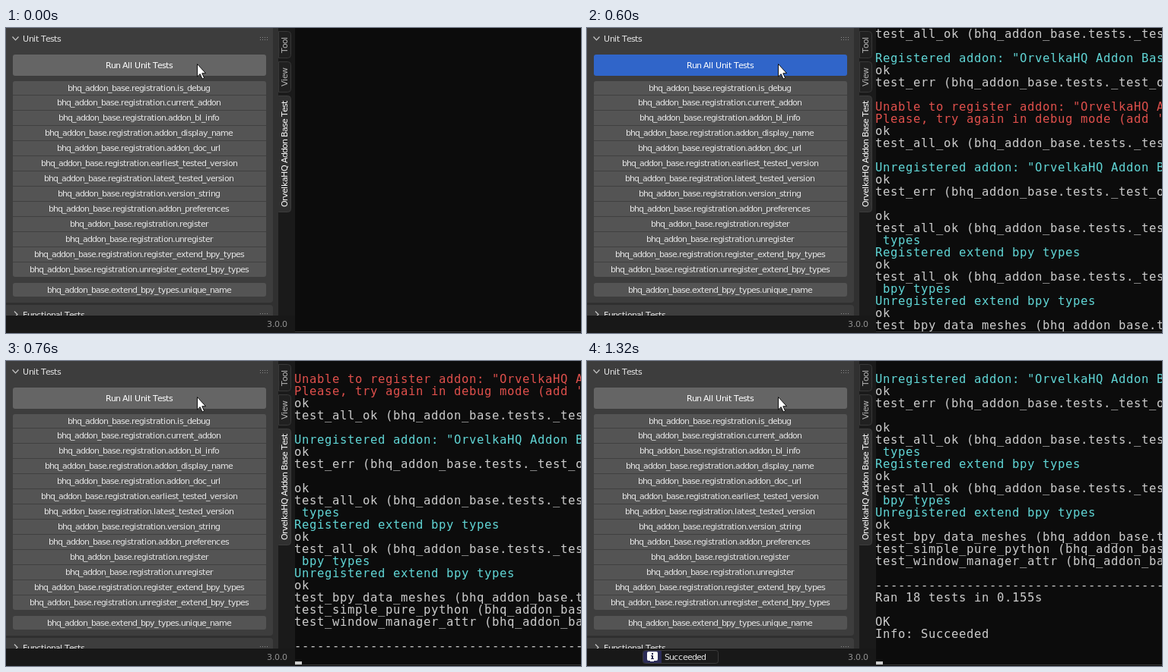
Write an HTML page with a canvas that moves like this. It is 756 px wide and 402 px high and loops after 1440 ms.

```html
<!DOCTYPE html>
<html lang="en">
<head>
<meta charset="utf-8">
<title>Unit test run</title>
<style>
  html, body { margin: 0; width: 100%; height: 100%; overflow: hidden; background: #0c0c0c; }
  canvas { display: block; }
</style>
</head>
<body>
<canvas id="stage" width="756" height="402"></canvas>
<script>
const ctx = document.getElementById('stage').getContext('2d');
const LOOP = 1440;
const UI_FAMILY = '"DejaVu Sans", sans-serif';
const UI_FONT = '11px ' + UI_FAMILY;
const TERM_FONT = '15.5px "DejaVu Sans Mono", monospace';
const CELL_W = 10, CELL_H = 16, TERM_X = 380;
const ADDON = 'OrvelkaHQ Addon Base Test';

const TESTS = ['is_debug', 'current_addon', 'addon_bl_info', 'addon_display_name',
  'addon_doc_url', 'earliest_tested_version', 'latest_tested_version', 'version_string',
  'addon_preferences', 'register', 'unregister', 'register_extend_bpy_types',
  'unregister_extend_bpy_types'].map(name => 'bhq_addon_base.registration.' + name);

const GREY = '#cccccc', CYAN = '#61d6d6', RED = '#e0504c';
const say = (text = '', color = GREY) => ({ text, color });
const ok = say('ok'), blank = say();
const allOk = say('test_all_ok (bhq_addon_base.tests._test_ok');
const err = say('test_err (bhq_addon_base.tests._test_one');
const LINES = [
  allOk, blank, say(`Registered addon: "${ADDON}"`, CYAN), ok,
  err, blank, say(`Unable to register addon: "${ADDON}"`, RED),
  say("Please, try again in debug mode (add '--debug'", RED), ok,
  allOk, blank, say(`Unregistered addon: "${ADDON}"`, CYAN), ok,
  err, blank, ok,
  allOk, say(' types', CYAN), say('Registered extend bpy types', CYAN), ok,
  allOk, say(' bpy types', CYAN), say('Unregistered extend bpy types', CYAN), ok,
  say('test_bpy_data_meshes (bhq_addon_base.tests'),
  say('test_simple_pure_python (bhq_addon_base.tests'),
  say('test_window_manager_attr (bhq_addon_base.tests'),
  blank, say('-'.repeat(70)), say('Ran 18 tests in 0.155s'),
  blank, say('OK'), say('Info: Succeeded'), blank
];

// [start ms, lines scrolled off the top]
const SCROLL = [[600, 0], [620, 1], [760, 5], [780, 10]];
const PRESS = [420, 760];
const REPORT = [780, 880];

// Interface text advances by whole pixels, rounded down.
const advances = {};
function advance(ch) {
  if (!(ch in advances)) {
    ctx.font = '1100px ' + UI_FAMILY;
    advances[ch] = Math.floor(ctx.measureText(ch).width / 100 + 0.01);
  }
  return advances[ch];
}
const textWidth = text => [...text].reduce((sum, ch) => sum + advance(ch), 0);

function uiText(text, x, y, color = '#e6e6e6') {
  textWidth(text);
  ctx.font = UI_FONT;
  ctx.fillStyle = color;
  for (const ch of text) {
    ctx.fillText(ch, x, y);
    x += advance(ch);
  }
}
const centered = (text, y, color) =>
  uiText(text, Math.floor(175 - textWidth(text) / 2), y, color);

function rect(x, y, w, h, color) {
  ctx.fillStyle = color;
  ctx.fillRect(x, y, w, h);
}
function rounded(x, y, w, h, r, fill, stroke) {
  ctx.beginPath();
  ctx.roundRect(x, y, w, h, r);
  ctx.fillStyle = fill;
  ctx.fill();
  if (stroke) {
    ctx.strokeStyle = stroke;
    ctx.lineWidth = 1;
    ctx.stroke();
  }
}
function polyline(points, color, width) {
  ctx.beginPath();
  points.forEach(([x, y]) => ctx.lineTo(x, y));
  ctx.strokeStyle = color;
  ctx.lineWidth = width;
  ctx.stroke();
}
function clipped(x, y, w, h, draw) {
  ctx.save();
  ctx.beginPath();
  ctx.rect(x, y, w, h);
  ctx.clip();
  draw();
  ctx.restore();
}

function header(title, y, chevron) {
  polyline(chevron, '#c8c8c8', 1.2);
  uiText(title, 22, y + 4);
  for (let i = 0; i < 8; i++) rect(334 + (i % 4) * 3, y - 2 + (i >> 2) * 3, 1, 1, '#8a8a8a');
}

function tab(label, top, bottom, active) {
  rounded(358.5, top + 0.5, 16, bottom - top - 1, [0, 4, 4, 0],
    active ? '#303030' : '#202020', active ? '#3c3c3c' : '#383838');
  if (active) rect(357, top + 1, 3, bottom - top - 2, '#303030');
  ctx.save();
  ctx.translate(370, Math.round((top + bottom) / 2 + textWidth(label) / 2));
  ctx.rotate(-Math.PI / 2);
  uiText(label, 0, 0, active ? '#ffffff' : '#b4b4b4');
  ctx.restore();
}

function pointer() {
  ctx.beginPath();
  [[251.5, 47.5], [251.5, 64], [255.2, 60.6], [258, 67], [260.6, 65.9], [257.8, 59.7], [262.6, 59.7]]
    .forEach(([x, y]) => ctx.lineTo(x, y));
  ctx.closePath();
  ctx.fillStyle = '#ffffff';
  ctx.fill();
  ctx.strokeStyle = '#101010';
  ctx.lineWidth = 1;
  ctx.stroke();
}

function sidebar(pressed) {
  rect(0, 0, 358, 379, '#303030');
  rounded(-8, -8, 359, 370, 4, '#3d3d3d');
  rounded(-8, 365, 359, 30, 4, '#3d3d3d');
  header('Unit Tests', 14, [[8.5, 11.5], [12.5, 15.8], [16.5, 11.5]]);
  header('Functional Tests', 378, [[11, 373.5], [15, 377.5], [11, 381.5]]);

  rounded(9, 35, 333, 28, 3, pressed ? '#3065c9' : '#656565');
  centered('Run All Unit Tests', 53, '#ffffff');

  rounded(9, 70, 333, 258, 3, '#545454');
  TESTS.forEach((name, i) => {
    if (i) rect(9, 68 + 20 * i, 333, 1, '#404040');
    centered(name, i ? 82 + 20 * i : 83);
  });
  rounded(9, 336, 333, 18, 3, '#545454');
  centered('bhq_addon_base.extend_bpy_types.unique_name', 349);
}

function report(grow) {
  if (grow <= 0) return;
  clipped(72, 380, 101 * grow, 20, () => {
    rounded(73.5, 381.5, 99, 17, 3, '#1b1b1b', '#3a3a3a');
    rounded(74, 382, 24, 16, [3, 0, 0, 3], '#2c2c58');
    rounded(79, 383, 14, 12, 2, '#ffffff');
    rect(83, 394, 5, 2, '#ffffff');
    rect(85, 385, 2, 2, '#24244c');
    rect(84, 388, 3, 1, '#24244c');
    rect(85, 388, 2, 5, '#24244c');
    rect(84, 392, 4, 1, '#24244c');
    uiText('Succeeded', 102, 394);
  });
}

function terminal(time) {
  rect(TERM_X, 0, 376, 402, '#0c0c0c');
  const step = SCROLL.filter(([start]) => time >= start).pop();
  if (step) {
    const top = step[1];
    const end = Math.min(top + (top ? 24 : 25), LINES.length);
    clipped(TERM_X - 1, 0, 377, 400, () => {
      ctx.font = TERM_FONT;
      for (let row = top; row < end; row++) {
        const { text, color } = LINES[row];
        ctx.fillStyle = color;
        for (let i = 0; i < Math.min(text.length, 39); i++) {
          ctx.fillText(text[i], TERM_X - 1 + i * CELL_W, (row - top) * CELL_H + 13);
        }
      }
    });
    if (top) rect(TERM_X, 396, 9, 4, GREY);
  }
  rect(TERM_X, 400, 376, 1, '#383838');
}

function draw(time) {
  rect(0, 0, 380, 402, '#1a1a1a');
  clipped(0, 0, 380, 379, () => {
    sidebar(time >= PRESS[0] && time < PRESS[1]);
    tab('Tool', 4, 40);
    tab('View', 44, 85);
    tab(ADDON, 89, 243, true);
  });
  rect(0, 379, 380, 23, '#181818');
  uiText('3.0.0', 343, 394, '#919191');
  report(Math.min(1, (time - REPORT[0]) / (REPORT[1] - REPORT[0])));
  terminal(time);
  pointer();
}

const begin = performance.now();
function tick() {
  draw((performance.now() - begin) % LOOP);
  requestAnimationFrame(tick);
}
tick();
</script>
</body>
</html>
```
